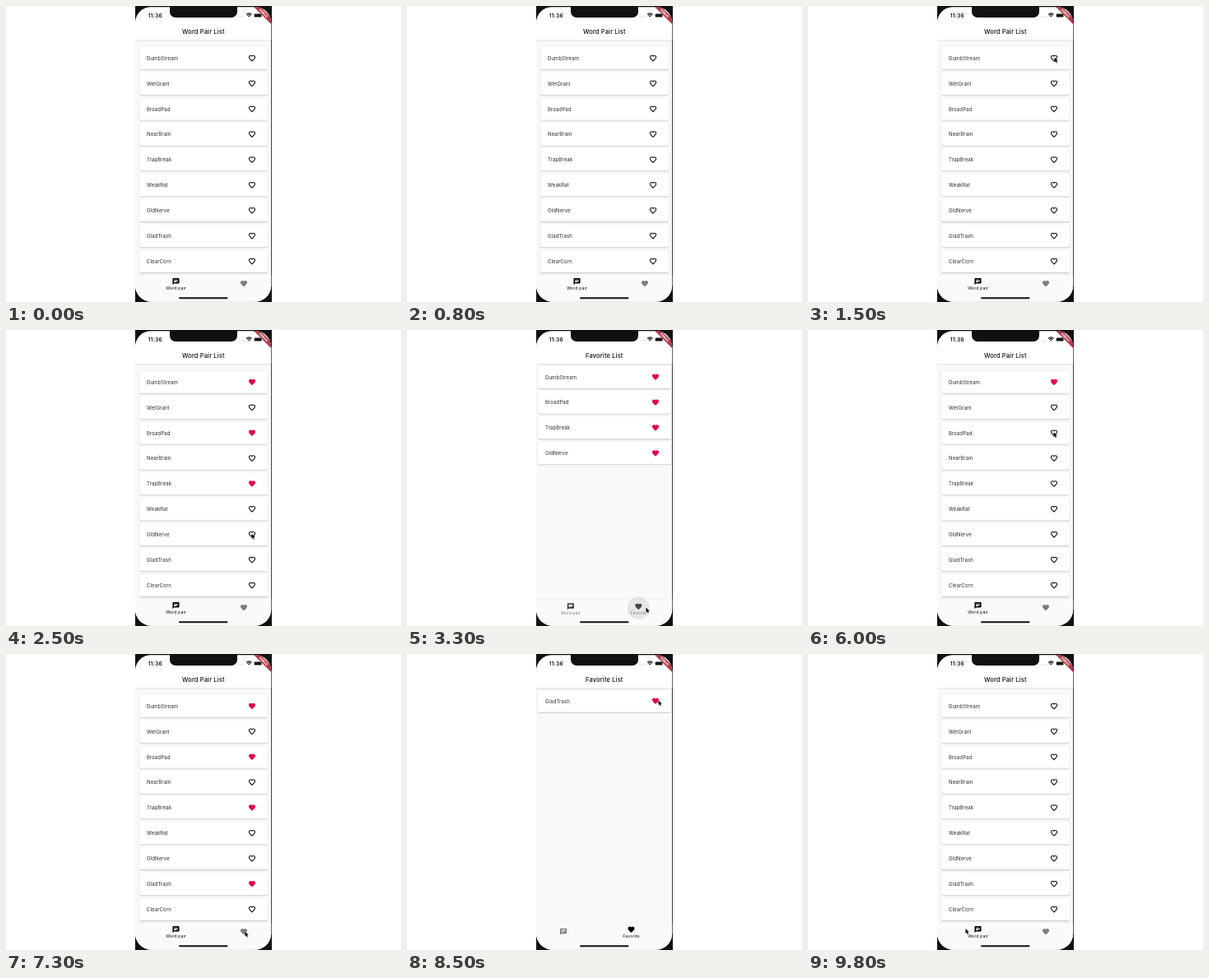
These frames come from a looping animation (480x360 px, 10 s). An HTML page with a canvas:

```html
<!DOCTYPE html>
<html lang="en">
<head>
<meta charset="utf-8">
<title>Word Pair List</title>
<style>
html, body { margin: 0; width: 100%; height: 100%; overflow: hidden; background: #fff; }
canvas { display: block; width: 480px; height: 360px; }
</style>
</head>
<body>
<canvas id="stage"></canvas>
<script>
const canvas = document.getElementById('stage');
const c = canvas.getContext('2d');
const dpr = window.devicePixelRatio || 1;
canvas.width = 480 * dpr;
canvas.height = 360 * dpr;

// icons on a 24 unit grid
const HEART = new Path2D('M12 21.35C5.4 15.36 2 12.28 2 8.5 2 5.42 4.42 3 7.5 3c1.74 0 3.41.81 4.5 2.09C13.09 3.81 14.76 3 16.5 3 19.58 3 22 5.42 22 8.5c0 3.78-3.4 6.86-10 12.85z');
const CHAT = new Path2D('M4 2H20q2 0 2 2V16q0 2-2 2H6L2 22V4q0-2 2-2zM6 6V8H18V6zM6 9V11H18V9zM6 12V14H14V12z');
const ARROW = new Path2D('M0 0V6L1.4 4.8 2.4 7 3.4 6.6 2.4 4.4H4.3z');

const WORDS = ['DumbStream', 'WetGrant', 'BroadPad', 'NearBrain', 'TrapBreak',
  'WeakRat', 'OldNerve', 'GladTrash', 'ClearCorn'];
const ROW = 30.88;
const INK = '#111';

const clamp = v => Math.max(0, Math.min(1, v));
const smooth = v => (v = clamp(v), v * v * (3 - 2 * v));
const mix = (a, b, k) => a + (b - a) * k;
const heartX = tab => tab ? 302 : 299;
const rowY = (tab, row) => (tab ? 57.2 : 63.4) + row * ROW;

// Each round likes four words, opens the favorites, clears them and goes back.
const taps = [];
function addRound(start, picks) {
  picks.forEach((word, i) => taps.push(
    { at: start + 325 * i, word, x: heartX(0) + i % 2 * -1 + 0.5, y: rowY(0, word) - 1 },
    { at: start + 2000 + 290 * i, word, x: heartX(1) + 3.5, y: rowY(1, 0) - 1 }));
  taps.push({ at: start + 1605, tab: 1, x: 290.5, y: 337.5 },
    { at: start + 3455, tab: 0, x: 191.5, y: 334 });
}
addRound(1600, [0, 2, 4, 6]);
addRound(5800, [0, 2, 4, 7]);
taps.sort((a, b) => a.at - b.at);
const switches = taps.filter(tap => 'tab' in tap);

function text(str, x, y, size, weight = 400, align = 'left', color = '#2a2a2a') {
  c.font = `${weight} ${size}px Inter, Roboto, sans-serif`;
  c.letterSpacing = size * 0.02 + 'px';
  c.textAlign = align;
  c.fillStyle = color;
  c.fillText(str, x, y + size * 0.36);
}

function box(x, y, w, h, r, color) {
  c.beginPath();
  c.roundRect(x, y, w, h, r);
  c.fillStyle = color;
  c.fill();
}

function raisedBox(x, y, w, h, r, depth) {
  c.save();
  c.shadowColor = `rgba(0,0,0,${0.28 * depth})`;
  c.shadowBlur = 1.5 * depth * dpr;
  c.shadowOffsetY = 0.6 * depth * dpr;
  box(x, y, w, h, r, '#fff');
  c.restore();
}

function disc(x, y, r, color) {
  c.beginPath();
  c.arc(x, y, r, 0, 7);
  c.fillStyle = color;
  c.fill();
}

function icon(path, x, y, color, outline) {
  const k = outline ? 0.36 : 0.405;
  c.save();
  c.translate(x, y);
  c.scale(k, k);
  c.translate(-12, -12);
  c.fillStyle = c.strokeStyle = color;
  c.lineWidth = 2.9;
  if (outline) c.stroke(path);
  else c.fill(path, 'evenodd');
  c.restore();
}

function card(word, row, tab, liked) {
  const x = tab ? 159 : 162, y = rowY(tab, row);
  raisedBox(x, y - 14, 480 - 2 * x, 27.6, 1.6, 1);
  text(word, x + 9, y + 0.2, 6);
  icon(HEART, heartX(tab), y, liked ? '#e5004c' : INK, !liked);
}

function navItem(path, label, x, on) {
  const g = Math.round(mix(125, 0, on));
  icon(path, x, mix(337.7, 335.1, on), `rgb(${g},${g},${g})`);
  c.globalAlpha = on;
  text(label, x, mix(345, 342.8, on), mix(4.8, 5.2, on), 400, 'center', INK);
  c.globalAlpha = 1;
}

function navBar(t, p) {
  box(157, 327, 166, 33, 0, '#fafafa');
  box(157, 326.6, 166, 0.6, 0, 'rgba(0,0,0,.06)');
  // the selected tab is half as wide again as the other one
  const split = 165 * mix(0.6, 0.4, p);
  const xs = [157 + split / 2, 157 + (split + 165) / 2];
  for (const { at, tab } of switches) {
    const age = t - at + 100;
    if (age <= 0) continue;
    const fade = 1 - clamp((age - 200) / 150);
    disc(xs[tab], 338.2, mix(5, 13.7, clamp(age / 195)), `rgba(0,0,0,${0.08 * fade})`);
  }
  navItem(CHAT, 'Word pair', xs[0], 1 - p);
  navItem(HEART, 'Favorite', xs[1], p);
}

function statusBar() {
  text('11:36', 181.3, 11.5, 6.7, 600, 'center', INK);
  for (let i = 0; i < 4; i++) disc(283.3 + i * 2.1, 13, 0.55, '#bbb');
  c.strokeStyle = INK;
  c.lineWidth = 1.1;
  for (let r = 1.2; r < 5; r += 1.75) {
    c.beginPath();
    c.arc(295.3, 13.6, r, -Math.PI * 0.75, -Math.PI * 0.25);
    c.stroke();
  }
  box(301.7, 9.4, 8.8, 4.2, 1.2, INK);
}

function banner() {
  c.save();
  c.translate(313, 9);
  c.rotate(Math.PI / 4);
  box(-25, -2.8, 50, 5.6, 0, '#b43c4b');
  text('DEBUG', 0, 0, 3.6, 800, 'center', '#fff');
  c.restore();
}

function notch() {
  box(157, 0, 166, 1.2, 0, INK);
  box(199, -8, 82, 22, 7, INK);
}

// rests around each tap and glides on to the next one
function pointer(t) {
  if (t < 1000) return;
  const i = taps.findIndex(tap => tap.at > t);
  const from = taps.at(i < 0 ? -1 : i - 1), to = taps[i] || from;
  const start = i ? from : { at: 900, x: 314, y: 362 };
  const k = smooth((t - start.at - 100) / (to.at - start.at - 225));
  c.save();
  c.translate(mix(start.x, to.x, k), mix(start.y, to.y, k));
  c.strokeStyle = 'rgba(255,255,255,.8)';
  c.lineWidth = 0.6;
  c.stroke(ARROW);
  c.fillStyle = '#000';
  c.fill(ARROW);
  c.restore();
}

function draw(t) {
  let tab = 0, p = 0;
  const liked = WORDS.map(() => false);
  for (const tap of taps) {
    if (t < tap.at) break;
    if ('tab' in tap) {
      tab = tap.tab;
      p = mix(1 - tab, tab, smooth((t - tap.at) / 200));
    } else liked[tap.word] = !liked[tap.word];
  }

  c.setTransform(dpr, 0, 0, dpr, 0, 0);
  box(0, 0, 480, 360, 0, '#fff');
  box(157, 0, 166, 360, 0, INK);

  c.save();
  c.beginPath();
  c.roundRect(157, 1, 165.2, 358.8, 20);
  c.clip();
  box(157, 0, 166, 360, 0, '#f9f9f9');
  let row = 0;
  WORDS.forEach((word, i) => {
    if (!tab || liked[i]) card(word, row++, tab, liked[i]);
  });
  raisedBox(155, -2, 170, 43.4, 0, 1.4);
  text(tab ? 'Favorite List' : 'Word Pair List', 239.8, 31, 7.5, 500, 'center', INK);
  navBar(t, p);
  statusBar();
  banner();
  box(210, 354.2, 59.5, 2.1, 1, INK);
  c.restore();

  notch();
  pointer(t);
}

function loop() {
  draw(Math.min(9800, Math.floor(performance.now() % 10000 / 100) * 100));
  requestAnimationFrame(loop);
}
loop();
</script>
</body>
</html>
```
